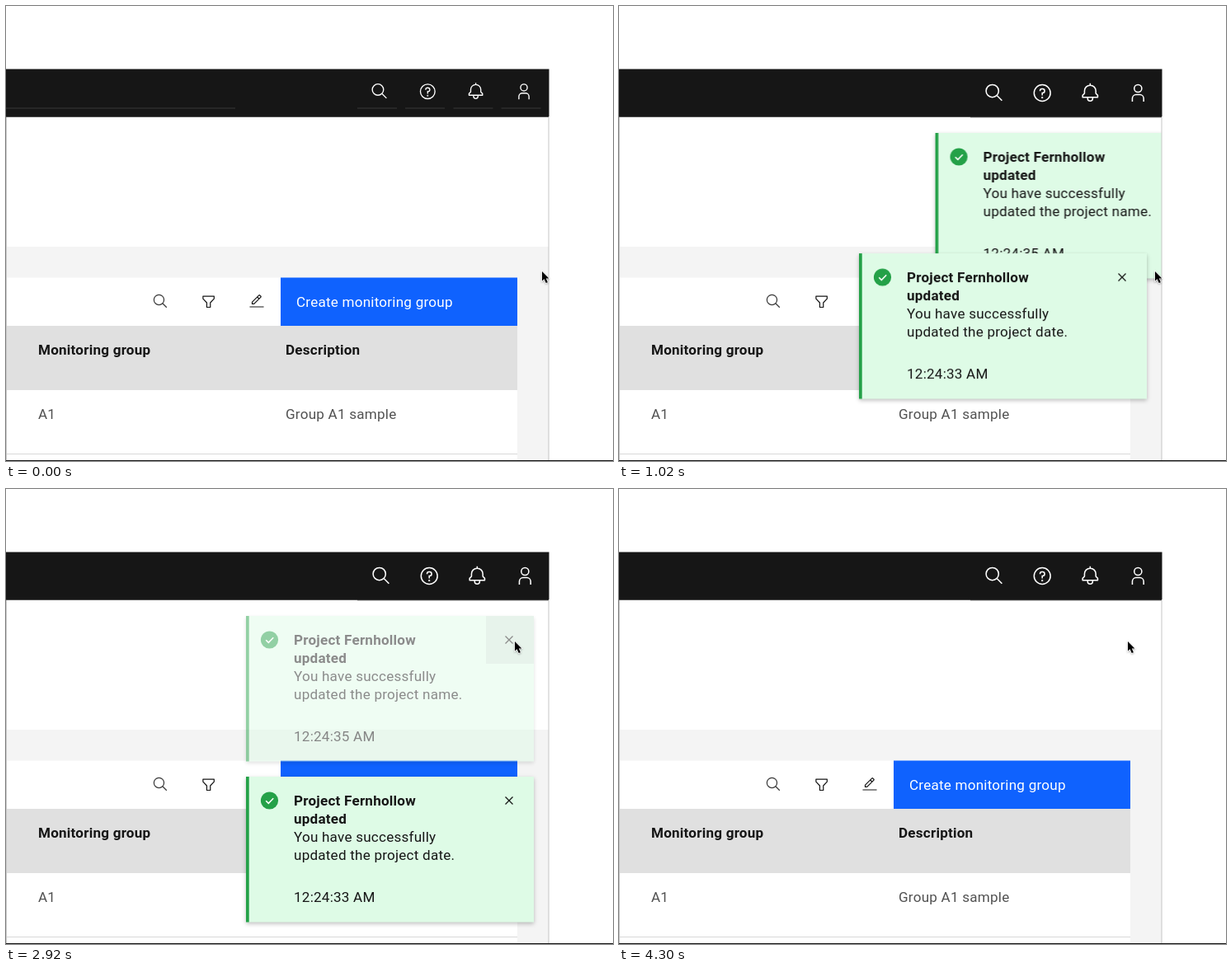
Animation, 736 px wide and 552 px high, one loop 4490 ms. Source, as an HTML page:

```html
<!DOCTYPE html>
<html lang="en">
<head>
<meta charset="utf-8">
<title>Stacked toast notifications</title>
<style>
  html, body { margin: 0; width: 100%; height: 100%; overflow: hidden; background: #fff; }
  svg { display: block; width: 736px; height: 552px; }
  text { font: 400 17.07px Roboto, "Noto Sans", sans-serif; letter-spacing: .23px; fill: #161616; white-space: pre; }
  .bold { font-weight: 600; }
  .cell { fill: #525252; }
  .icon { fill: none; stroke: #161616; stroke-width: 2; }
  .light { stroke: #fff; }
  .panel { fill: #defbe6; filter: drop-shadow(0 2px 2.5px rgba(0, 0, 0, .25)); }

  .anim { animation: 4490ms linear infinite; }
  .swap { animation-timing-function: step-end; }
  .first { animation-name: first-move; }
  .first-fade { animation-name: first-fade; }
  .second { animation-name: second-move; }
  .second-fade { animation-name: second-fade; }
  .first-hover { animation-name: first-hover; }
  .second-hover { animation-name: second-hover; }
  .pointer { animation-name: pointer-move; }
  .arrow { animation-name: arrow-show; }
  .hand { animation-name: hand-show; }
  .bar-idle { animation-name: bar-idle; }
  .bar-live { animation-name: bar-live; }

  @keyframes first-move {
    0%, 7.572% { transform: translate(668px, 154px); animation-timing-function: cubic-bezier(.4, 0, .3, 1); }
    11.136%, 16.036% { transform: translate(291px, 154px); animation-timing-function: cubic-bezier(.685, 0, .336, 1); }
    27.171%, 65.256% { transform: translate(291px, 349px); animation-timing-function: cubic-bezier(.685, 0, .336, 1); }
    71.715%, 100% { transform: translate(291px, 154px); }
  }
  @keyframes second-move {
    0%, 16.036% { transform: translate(660px, 154px); animation-timing-function: cubic-bezier(.685, 0, .336, 1); }
    27.171%, 100% { transform: translate(291px, 154px); }
  }
  @keyframes second-fade {
    0% { opacity: 0; animation-timing-function: step-end; }
    16.036%, 60.579% { opacity: 1; animation-timing-function: cubic-bezier(.5, 0, .5, 1); }
    69.488%, 100% { opacity: 0; }
  }
  @keyframes first-fade {
    0%, 86.86% { opacity: 1; animation-timing-function: cubic-bezier(.5, 0, .5, 1); }
    95.768%, 100% { opacity: 0; }
  }
  @keyframes second-hover {
    0%, 56.57% { opacity: 0; }
    58.797%, 100% { opacity: 1; }
  }
  @keyframes first-hover {
    0%, 82.851% { opacity: 0; }
    85.078%, 100% { opacity: 1; }
  }
  @keyframes pointer-move {
    0%, 37.194% { transform: translate(650px, 322px); animation-timing-function: cubic-bezier(.46, 0, .54, 1); }
    51.67%, 100% { transform: translate(617px, 185px); }
  }
  @keyframes arrow-show {
    0% { opacity: 1; }
    46.77% { opacity: 0; }
    60.579% { opacity: 1; }
    70.379% { opacity: 0; }
    86.86%, 100% { opacity: 1; }
  }
  @keyframes hand-show {
    0% { opacity: 0; }
    46.77% { opacity: 1; }
    60.579% { opacity: 0; }
    70.379% { opacity: 1; }
    86.86%, 100% { opacity: 0; }
  }
  @keyframes bar-idle {
    0% { opacity: 1; }
    8.018%, 100% { opacity: 0; }
  }
  @keyframes bar-live {
    0% { opacity: 0; }
    8.018%, 100% { opacity: 1; }
  }
</style>
</head>
<body>
<svg viewBox="0 0 736 552">
  <defs>
    <clipPath id="window"><rect y="135" width="658" height="416"/></clipPath>

    <!-- icons on a 32 unit grid, centred on the origin -->
    <g id="search" transform="translate(-16 -16)"><circle cx="13" cy="13" r="10"/><path d="M20.5 20.5 28.3 28.3"/></g>
    <g id="help" transform="translate(-16 -16)">
      <circle cx="16" cy="16" r="13"/>
      <path d="M12.5 13.2v-.7a3 3 0 0 1 3-3h1a3.25 3.25 0 0 1 0 6.5H16v4"/>
      <circle cx="16" cy="23.5" r=".5"/>
    </g>
    <g id="bell" transform="translate(-16 -16)">
      <path d="M4 23v-3l3-3v-4a9 9 0 0 1 18 0v4l3 3v3zM16 1v3M12 23v2a4 4 0 0 0 8 0v-2" stroke-linejoin="round"/>
    </g>
    <g id="user" transform="translate(-16 -16)">
      <circle cx="16" cy="9" r="6"/><path d="M7 30v-5a6 6 0 0 1 6-6h6a6 6 0 0 1 6 6v5"/>
    </g>
    <g id="filter" transform="translate(-16 -16)">
      <path d="M5 5h22v5l-7.5 8V27h-7v-9L5 10z" stroke-linejoin="round"/>
    </g>
    <g id="edit" transform="translate(-16 -16)">
      <path d="M2 27h28M7 21v-3.6L20.6 3.8a1 1 0 0 1 1.4 0l2.2 2.2a1 1 0 0 1 0 1.4L10.6 21zM17 7.4l3.6 3.6"/>
    </g>

    <g id="toast">
      <rect class="panel" width="349" height="176.5"/>
      <rect width="3.7" height="176.5" fill="#24a148"/>
      <circle cx="28.5" cy="29" r="10.6" fill="#24a148"/>
      <path d="M24.2 29.2 27.3 32.3 33.2 26.3" fill="none" stroke="#fff" stroke-width="1.6"/>
      <text class="bold" x="58" y="35">Project Fernhollow</text>
      <text class="bold" x="58" y="57">updated</text>
      <text x="58" y="79">You have successfully</text>
    </g>
    <path id="close" d="M314.5 24.5l9 9m0-9l-9 9" stroke="#161616" stroke-width="1.3"/>
    <rect id="hover" x="291" width="58" height="58" fill="#8d8d8d" fill-opacity=".18"/>
  </defs>

  <rect width="736" height="552" fill="#fff"/>

  <!-- header bar -->
  <rect y="76.5" width="658.5" height="57.5" fill="#161616"/>
  <path d="M0 134.5h658" stroke="#525252"/>
  <g class="anim swap bar-idle">
    <path d="M0 124h278M426 124h48M484 124h48M542.5 124h48M600.5 124h48" stroke="#393939"/>
    <g class="icon light">
      <use href="#search" transform="translate(453 103.5) scale(.68)"/>
      <use href="#help" transform="translate(511.3 103.7) scale(.68)"/>
      <use href="#bell" transform="translate(569.6 103.5) scale(.68)"/>
      <use href="#user" transform="translate(628 103.7) scale(.68)"/>
    </g>
  </g>
  <g class="anim swap bar-live">
    <path d="M426 134.5h232" stroke="#393939"/>
    <path d="M426 135.5h232" stroke="#c6c6c6"/>
    <g class="icon light">
      <use href="#search" transform="translate(455 105.3) scale(.7625)"/>
      <use href="#help" transform="translate(513.2 105.5) scale(.7625)"/>
      <use href="#bell" transform="translate(571.3 105.3) scale(.7625)"/>
      <use href="#user" transform="translate(629.3 105.3) scale(.7625)"/>
    </g>
  </g>

  <!-- page and table -->
  <rect y="292" width="658" height="260" fill="#f4f4f4"/>
  <rect y="329.5" width="620" height="222" fill="#fff"/>
  <rect x="333" y="329.5" width="287" height="58.5" fill="#0f62fe"/>
  <rect y="388" width="620" height="78" fill="#e0e0e0"/>
  <path d="M0 543.5h620" stroke="#d8d8d8"/>
  <g class="icon">
    <use href="#search" transform="translate(187.3 358.3) scale(.61)" stroke="#393939"/>
    <use href="#filter" transform="translate(245.6 358.8) scale(.61)"/>
    <use href="#edit" transform="translate(304 358.3) scale(.61)"/>
  </g>
  <text x="352" y="365" style="fill:#fff">Create monitoring group</text>
  <text class="bold" x="39" y="423">Monitoring group</text>
  <text class="bold" x="339" y="423">Description</text>
  <text class="cell" x="39" y="501">A1</text>
  <text class="cell" x="339" y="501">Group A1 sample</text>

  <!-- toasts -->
  <g clip-path="url(#window)">
    <g class="anim second">
      <g class="anim second-fade">
        <use href="#toast"/>
        <text x="58" y="101">updated the project name.</text>
        <text x="58" y="152">12:24:35 AM</text>
        <use class="anim second-hover" href="#hover"/>
        <use href="#close"/>
      </g>
    </g>
    <g class="anim first">
      <g class="anim first-fade">
        <use href="#toast"/>
        <text x="58" y="101">updated the project date.</text>
        <text x="58" y="152">12:24:33 AM</text>
        <use class="anim first-hover" href="#hover"/>
        <use href="#close"/>
      </g>
    </g>
  </g>

  <path d="M.5 135v416M658 135v416" stroke="#c6c6c6"/>
  <path d="M0 551.5h736" stroke="#161616"/>

  <!-- pointer -->
  <g class="anim pointer" style="filter:drop-shadow(0 1px 1px rgba(0,0,0,.3))">
    <path class="anim swap arrow" d="M0 0v11.6l2.6-2.4 2.1 4.9 2.2-.9-2.1-4.8h3.6z"
      fill="#000" stroke="#fff" stroke-width="1.2" paint-order="stroke"/>
    <g class="anim swap hand" stroke="#000" stroke-linejoin="round" stroke-linecap="round">
      <g transform="translate(.4 .6) scale(1.1)">
        <path d="M-.5 1.8c-.4-1.5 1.6-2.1 2.2-.6l1.6 4.3c.3-1 1.8-1 2.2.1.4-.8 1.8-.7 2.1.4.5-.7 1.7-.4 2 .6l.5 3.4c.2 1.8-.5 2.9-.8 4.1l-.1 2.4H2.4l-.5-1.9C.6 13-1.5 11-3.2 8.9c-1-1.3.7-2.3 1.8-1.3L1 9.5z" fill="#fff" stroke-width="1"/>
        <path d="M4.3 10.5v3M6 10.4v3M7.7 10.3v3" fill="none" stroke-width=".8"/>
      </g>
    </g>
  </g>
</svg>
</body>
</html>
```
